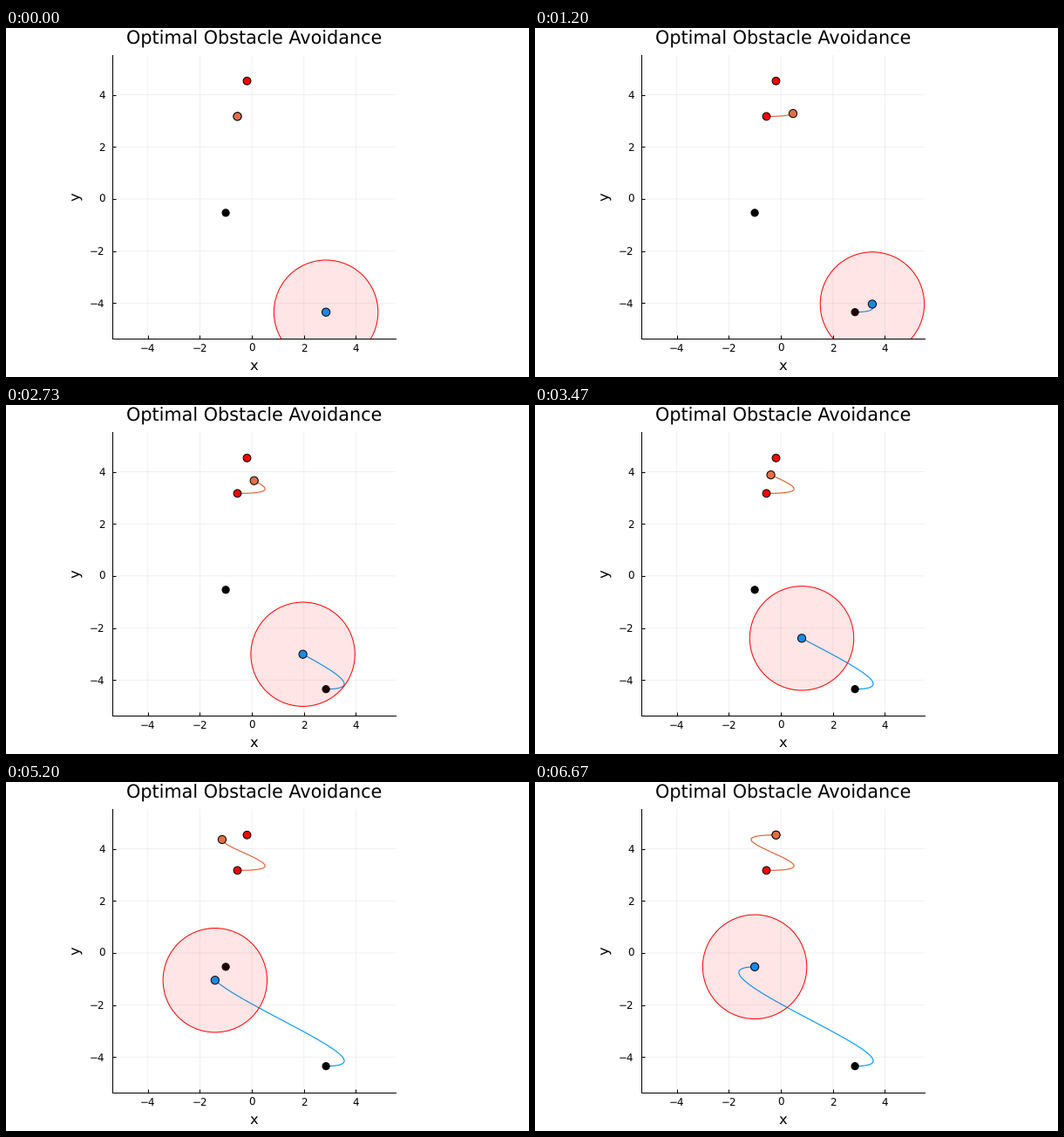
A matplotlib script that plays this animation: 600x400 px, repeating every 6740 ms.

```python
import numpy as np
import matplotlib.pyplot as plt
from matplotlib.animation import FuncAnimation
from matplotlib.patches import Circle

W, H = 600, 400
PX = 0.72                  # one pixel in points at 100 dpi
LIMITS = (-5.35, 5.538)
UNIT = 325 / (LIMITS[1] - LIMITS[0])
STEPS = 100
TICKS_PER_STEP = 3         # finer clock, so each step starts on time
FRAMES = (STEPS + 1) * TICKS_PER_STEP
LOOP_MS = 6740
BLUE, ORANGE, DEEP_ORANGE = "#009AFA", "#E26F46", "#E05F35"

plt.rcParams["font.family"] = "DejaVu Sans"
plt.rcParams["text.hinting"] = "none"
fig = plt.figure(figsize=(W / 100, H / 100), dpi=100, facecolor="white")
ax = fig.add_axes([122.4 / W, 44.4 / H, 325 / W, 325 / H])


def label(x, y, text, size, ha="center", **kw):
    """Text with its baseline at a pixel position counted from the top left."""
    fig.text(x / W, 1 - y / H, text, fontsize=size * PX, ha=ha,
             va="baseline", color="black", **kw)


def setup_axes():
    ax.set(xlim=LIMITS, ylim=LIMITS)
    ticks = [-4, -2, 0, 2, 4]
    ax.set_xticks(ticks, [])
    ax.set_yticks(ticks, [])
    ax.tick_params(direction="in", length=4 * PX, width=PX)
    ax.grid(color="black", alpha=0.06, linewidth=PX, snap=False)
    ax.set_axisbelow(True)
    for side in ("top", "right"):
        ax.spines[side].set_visible(False)
    for side in ("left", "bottom"):
        ax.spines[side].set_linewidth(PX)

    label(285, 19, "Optimal Obstacle Avoidance", 20.8)
    label(284.5, 391.5, "x", 16.35)
    label(85.5, 193, "y", 16.35, rotation=90, rotation_mode="anchor")
    for v in ticks:
        text = str(v).replace("-", "\u2212")
        offset = (v - LIMITS[0]) * UNIT
        label(122.5 + offset, 371, text, 11.9)
        label(113.7, 355.5 - offset + 4.4, text, 11.9, ha="right")


def glide(start, end, a, b, c=0.0):
    """Smooth path between two values; a, b, c bend it away from a straight line."""
    s = np.linspace(0, 1, STEPS + 1)
    return start + (end - start) * s + s * (1 - s) * (a + b * s + c * s * s)


def dot(pos, color, radius, z):
    patch = Circle(pos, (radius - 0.5) / UNIT, facecolor=color,
                   edgecolor="black", linewidth=PX, zorder=z)
    return ax.add_patch(patch)


def trail(color):
    return ax.plot([], [], color=color, linewidth=1.15 * PX, zorder=3)[0]


setup_axes()

blue_path = np.column_stack([
    glide(2.848, -1.005, 14.155, -27.55),
    glide(-4.348, -0.533, -3.758, 6.536, 0.9),
])
orange_path = np.column_stack([
    glide(-0.556, -0.188, 9.95, -19.3),
    glide(3.169, 4.529, -1.4, 2.72),
])

for path, color, radius in ((blue_path, "black", 4.6), (orange_path, "red", 4.9)):
    dot(path[0], color, radius, 4)
    dot(path[-1], color, radius, 4)

movers = [
    (blue_path, trail(BLUE), dot(blue_path[0], BLUE, 5.1, 5)),
    (orange_path, trail(DEEP_ORANGE), dot(orange_path[0], ORANGE, 5.1, 5)),
]
zone = ax.add_patch(Circle(blue_path[0], 2, facecolor=(1, 0, 0, 0.1),
                           edgecolor="red", linewidth=PX, zorder=6))


def update(frame):
    k = min(round(frame / TICKS_PER_STEP), STEPS)
    for path, line, head in movers:
        line.set_data(path[:k + 1, 0], path[:k + 1, 1])
        head.center = path[k]
    zone.center = blue_path[k]
    return [zone]


anim = FuncAnimation(fig, update, frames=FRAMES, interval=LOOP_MS / FRAMES,
                     repeat=True, repeat_delay=0)
plt.show()
```
